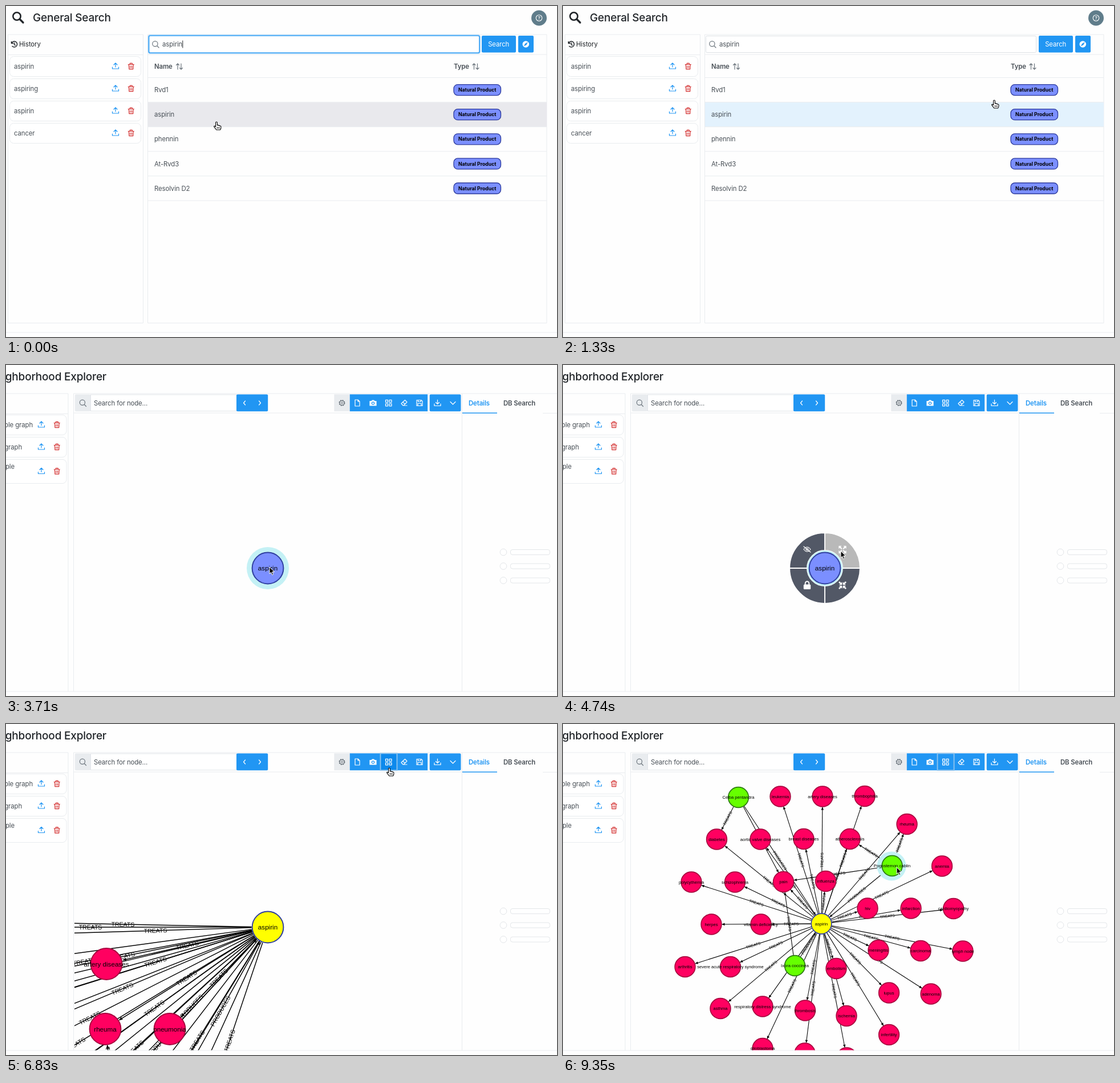
Write an HTML page that moves like this. It is 966 px wide and 580 px high and loops after 9.8 s.

```html
<!DOCTYPE html>
<html lang="en">
<head>
<meta charset="utf-8">
<title>Neighborhood Explorer</title>
<style>
html, body { margin: 0; width: 100%; height: 100%; overflow: hidden; background: #fefefe; }
svg { display: block; width: 966px; height: 580px; }
text { font: 11.4px Inter, Roboto, sans-serif; letter-spacing: -.12px; fill: #495057; }
.title { font-size: 19px; font-weight: 500; letter-spacing: -.2px; fill: #212529; }
.dark { fill: #212529; }
.bold { font-weight: 600; }
.white { fill: #fff; }
.badge { font-size: 8.7px; font-weight: 700; letter-spacing: 0; fill: #000; }
.graph text, .node { font-family: "Liberation Sans", Arial, sans-serif; letter-spacing: 0; fill: #000; text-anchor: middle; }
.end { text-anchor: end; }
.mid { text-anchor: middle; }
.line { stroke: #e9ecef; fill: none; }
.icon { fill: none; stroke-width: 1.2; stroke-linecap: round; stroke-linejoin: round; }
</style>
</head>
<body>
<svg id="stage" viewBox="0 0 966 580"></svg>
<script>
const BLUE = '#2196f3', HOVER = '#0d89ec', RED = '#d32f2f', GREY = '#6c757d';
const LOOP = 9800, STEPS = 66;

const text = (x, y, s, cls = '') => `<text x="${x}" y="${y}" class="${cls}">${s}</text>`;
const rect = (x, y, w, h, fill, more = '') =>
  `<rect x="${x}" y="${y}" width="${w}" height="${h}" fill="${fill}" ${more}/>`;
const line = d => `<path class="line" d="${d}"/>`;
const icon = (x, y, d, color, more = '') =>
  `<path class="icon" transform="translate(${x} ${y})" d="${d}" stroke="${color}" ${more}/>`;
const group = (id, body, more = '') => `<g id="${id}" ${more}>${body}</g>`;
const circle = (x, y, r, fill, more = '') => `<circle cx="${x}" cy="${y}" r="${r}" fill="${fill}" ${more}/>`;
const card = (x, y, w, h) => rect(x, y, w, h, '#fff', 'rx="7" stroke="#e9ecef"');

const ICON = {
  upload: 'M-5.5 1.5V4.5H5.5V1.5M0 1.5V-5.5M-3-2.5L0-5.5L3-2.5',
  download: 'M-5.5 1.5V5H5.5V1.5M0-5.5V2M-3-1L0 2L3-1',
  trash: 'M-5-3H5M-4-3L-3.4 5.2H3.4L4-3M-2-3V-5.2H2V-3M-1.3-.5V2.8M1.3-.5V2.8',
  glass: 'M3 3L6 6M4-.8A4.6 4.6 0 1 1-5.2-.8A4.6 4.6 0 1 1 4-.8',
  sort: 'M-3 5V-5M-5.5-2.5L-3-5L-.5-2.5M3-5V5M.5 2.5L3 5L5.5 2.5',
  file: 'M-4-5.5H1L4-2.5V5.5H-4ZM1-5.5V-2.5H4',
  grid: 'M-5-5H-1V-1H-5ZM1.5-5H5.5V-1H1.5ZM-5 1.5H-1V5.5H-5ZM1.5 1.5H5.5V5.5H1.5Z',
  eraser: 'M-5 1L1.5-5L5-1.5L-1 4.5H-2ZM-2.5-1.5L1.5 2M-1 4.5H5',
  save: 'M-5-5H3L5-3V5H-5ZM-2.5-5V-2H2V-5M-3 5V1H3V5',
  eye: 'M-6 0Q0-8 6 0Q0 8-6 0ZM2 0A2 2 0 1 1-2 0A2 2 0 1 1 2 0M-6-5L6 5'
};

const cardTools = (x, y) =>
  icon(x, y, ICON.upload, BLUE) + icon(x + 27.3, y, ICON.trash, RED);

function homePage() {
  let s = circle(19, 18, 6.7, 'none', 'stroke="#212529" stroke-width="2.6"') +
    icon(0, 0, 'M24.5 23.5L30 29', '#212529', 'style="stroke-width:3.2"') +
    text(47, 27, 'General Search', 'title') +
    circle(934.5, 21, 13.5, '#607d8b') +
    circle(934.5, 21, 5.3, 'none', 'stroke="#fff" stroke-width="1.1"') +
    `<text x="934.5" y="23.8" class="mid white bold" style="font-size:8px">?</text>` +
    line('M3.5 50V555.5H240.5V50ZM3 85.5H241M248.5 50V555.5H948V50ZM248 85H948') +
    icon(14.5, 67, 'M-4.5-2A5 5 0 1 1-3.5 3.5M-5-4.5V-1.5H-2M0-2.5V.5L2 1.8', '#212529', 'style="stroke-width:1.5"') +
    text(23, 71, 'History', 'dark');
  ['aspirin', 'aspiring', 'aspirin', 'cancer'].forEach((name, i) => {
    const y = 88.5 + i * 39;
    s += card(6.5, y, 230, 35) + text(14, y + 21.5, name) + cardTools(192, y + 17);
  });
  s += rect(250.5, 52.5, 579, 29, '#fff', 'rx="2" stroke="#dde1e5"') +
    group('focus', rect(250, 51.5, 580.5, 31, 'none', 'rx="3" stroke="#a6d5fa" stroke-width="3"') +
      rect(250.5, 52, 579.5, 30, 'none', 'rx="2" stroke="#2196f3" stroke-width="1.2"')) +
    icon(262, 67, ICON.glass, GREY) + text(274, 71, 'aspirin') +
    rect(309.3, 60.5, 1, 13, '#212529', 'id="caret"') +
    rect(834, 52, 60, 29.5, BLUE, 'rx="2"') + text(863.7, 71, 'Search', 'mid white') +
    rect(898, 52, 27, 29.5, BLUE, 'rx="2" id="compass"') +
    circle(911.3, 67, 5.8, '#fff') + icon(911.3, 67, 'M3-3L1 1L-3 3L-1-1Z', BLUE, 'style="fill:#2196f3;stroke-width:.5"') +
    text(260, 109.5, 'Name', 'bold') + icon(304, 106, ICON.sort, GREY) +
    text(785, 109.5, 'Type', 'bold') + icon(823.5, 106, ICON.sort, GREY) + line('M249 125.5H948');
  ['Rvd1', 'aspirin', 'phennin', 'At-Rvd3', 'Resolvin D2'].forEach((name, i) => {
    const y = 126 + i * 43.1;
    s += rect(249, y, 699, 42.8, 'none', `id="row${i}"`) + line(`M249 ${y + 42.6}H948`) +
      text(260, y + 25.2, name) +
      rect(785, y + 11.6, 82.5, 19, '#7b8fff', 'rx="7" stroke="#2c3a9c" stroke-width="1.3"') +
      text(826.2, y + 24.2, 'Natural Product', 'badge mid');
  });
  return s;
}

function explorerPage() {
  const button = (x, w, fill, more = '') => rect(x, 51.4, w, 29.8, fill, more);
  let s = text(176, 27, 'Neighborhood Explorer', 'title end') +
    line('M0 50H109V572M0 85.5H109M118.5 572V50H966M799.5 50V572M119 84H799M941 84.5H966');
  [[87.5, 35, 'Example graph', 47], [126.5, 35, 'Small graph', 28], [165.5, 42, 'Example', 15]].forEach(([y, h, name, x], i) => {
    s += card(-98, y, 204, h) + text(x, y + (i == 2 ? 16.5 : 21.5), name, 'end') + cardTools(62, y + h / 2 - .5);
  });
  s += button(120.8, 27.5, '#e9ecef', 'rx="2"') + icon(134.5, 66.5, ICON.glass, GREY) +
    rect(148.5, 52, 256, 28.7, '#fff', 'stroke="#e1e5e9"') + text(154, 70.5, 'Search for node...') +
    button(404, 55.2, BLUE, 'rx="2"') +
    icon(418, 66.5, 'M1.5-3.5L-1.5 0L1.5 3.5', '#fff') + icon(445, 66.5, 'M-1.5-3.5L1.5 0L-1.5 3.5', '#fff') +
    button(575.3, 28, '#e9ecef') +
    circle(589, 66.5, 4.6, 'none', `stroke="${GREY}" stroke-width="1.8" stroke-dasharray="2.2 1.4"`) +
    circle(589, 66.5, 4, 'none', `stroke="${GREY}"`) + circle(589, 66.5, 1.5, 'none', `stroke="${GREY}"`) +
    button(602.8, 136.4, BLUE) + button(742.7, 54.8, BLUE, 'rx="2"') +
    button(657, 28, HOVER, 'id="gridHover"') +
    rect(656.5, 51.5, 29, 29.6, 'none', 'id="gridFocus" stroke="#8fc4ee" stroke-width="1.8"') +
    icon(616, 66.5, ICON.file, '#fff') +
    icon(643.5, 66.5, 'M-5.5-3H-2.5L-1.5-4.5H1.5L2.5-3H5.5V4.5H-5.5Z', '#fff', 'style="fill:#fff"') +
    circle(643.5, 67, 2.2, 'none', `stroke="${BLUE}" stroke-width="1.2"`) +
    icon(670.5, 66.3, ICON.grid, '#fff') + icon(698, 66.5, ICON.eraser, '#fff') +
    icon(725, 66.5, ICON.save, '#fff') + icon(756.5, 66.5, ICON.download, '#fff') +
    icon(783.5, 66.5, 'M-4.5-2L0 2.5L4.5-2', '#fff') +
    `<text x="811" y="71" class="bold" style="fill:${BLUE}">Details</text>` + text(872, 71, 'DB Search', 'bold') +
    rect(800, 83.4, 61, 1.5, BLUE) + rect(863, 83.4, 78, 1.5, '#a5abb1', 'id="tabHover"');
  for (const y of [328, 352.5, 377.5])
    s += circle(872, y, 5.8, '#fff', 'stroke="#e3e6e9"') + rect(884.5, y - 4.5, 69, 9, '#fff', 'rx="3.5" stroke="#e3e6e9"');
  return s;
}

const PAINT = {
  red: ['#ff0060', '#a8063f'], green: ['#66ff00', '#2c7a10'],
  yellow: ['#ffff00', '#303f9f'], blue: ['#7b8fff', '#303f9f']
};

function node(x, y, name, kind, z) {
  const [fill, edge] = PAINT[kind];
  return circle(x, y, 27.4 * z, fill, `stroke="${edge}" stroke-width="${1.1 + .9 * z}"`) +
    `<text class="node" x="${x}" y="${y + 4 * z}" style="font-size:${11.65 * z}px">${name}</text>`;
}

function edge([x1, y1], [x2, y2], label, z) {
  const dx = x2 - x1, dy = y2 - y1, len = Math.hypot(dx, dy), ux = dx / len, uy = dy / len;
  const r = 28.5 * z, ex = x2 - ux * r, ey = y2 - uy * r, deg = Math.atan2(dy, dx) * 180 / Math.PI;
  const turn = deg > 90 ? deg - 180 : deg < -90 ? deg + 180 : deg;
  return `<path d="M${x1 + ux * r} ${y1 + uy * r}L${ex} ${ey}" stroke="#000" stroke-width="${.3 + 1.15 * z}"/>` +
    `<path d="M0 0L-6-2.8V2.8Z" transform="translate(${ex} ${ey}) rotate(${deg}) scale(${.45 + .55 * z})"/>` +
    `<text transform="translate(${(x1 + x2) / 2} ${(y1 + y2) / 2}) rotate(${turn})" y="${3.7 * z}" style="font-size:${10.5 * z}px">${label}</text>`;
}

function wideGraph() {
  const hub = [459, 356], plants = [[187, 638], [293, 650], [71, 774]];
  const ends = [[-163, 356], [-49, 346], [65, 368], [177, 420], [65, 478], [-47, 458], [-185, 476],
    [174, 534], [-51, 572], [-165, 674], [61, 640], [287, 534], [211, 754], [325, 754], [-9, 784], [-217, 768]];
  // nodes whose labels lie outside the view
  for (const y of [456, 530, 560, 585, 645]) ends.push([-275, y]);
  for (let x = -300; x < 250; x += 85) ends.push([x, 900]);
  return ends.map(p => edge(hub, p, 'TREATS', 1)).join('') +
    plants.map(p => edge(p, hub, 'PRODUCES', 1)).join('') +
    edge(plants[0], [174, 534], 'TREATS', 1) +
    node(176, 420.5, 'artery diseases', 'red', 1) + node(174, 534.5, 'rheuma', 'red', 1) +
    node(287, 534.5, 'pneumonia', 'red', 1) + node(...hub, 'aspirin', 'yellow', 1);
}

const DISEASES = `leukemia 381 127,artery diseases 455 127,thrombophilia 529 126.5,diabetes 269.5 202,
aortic valve diseases 346 202,breast diseases 422 201.5,atherosclerosis 503 201.5,rheuma 603 175.5,anemia 664.5 249,
polycythemia 225 277,schizophrenia 301.5 277,pain 386.5 276.5,influenza 460.5 275.5,hiv 534 323,infarction 610 323,
cardiomyopathy 684.5 323.5,herpes 260 351,vitamin deficiency 347 351,meningitis 553 396.5,carcinoma 627 397.5,
lymph node 701 398,arthritis 214 425.5,severe acute respiratory syndrome 293.5 425.5,embolism 479 428.5,
lupus 571.5 471,adenoma 645 473,asthma 276 498.5,respiratory distress syndrome 350 495,thrombosis 424.5 502,
ischemia 497 511.5,infertility 571.5 544.5,glioblastoma 350 568.5,pneumonia 424 577,stroke 497.5 585`;

function fullGraph() {
  const z = .652, hub = [453, 350], at = {};
  const plants = { 'Ceiba pentandra': [307.5, 128.5], 'Pogostemon cablin': [577, 248.5], 'Ixora coccinea': [406.5, 423.5] };
  const treats = {
    'Ceiba pentandra': ['diabetes', 'pain'],
    'Pogostemon cablin': ['atherosclerosis', 'rheuma', 'pain'],
    'Ixora coccinea': ['pain']
  };
  let edges = '', nodes = '';
  for (const item of DISEASES.split(',')) {
    const [, name, x, y] = item.trim().match(/^(.+) (\S+) (\S+)$/);
    at[name] = [+x, +y];
    edges += edge(hub, at[name], 'TREATS', z);
    nodes += node(+x, +y, name, 'red', z);
  }
  for (const name in plants) {
    edges += edge(plants[name], hub, 'PRODUCES', z);
    for (const to of treats[name]) edges += edge(plants[name], at[to], 'TREATS', z);
    nodes += node(...plants[name], name, 'green', z);
  }
  return edges + halo('hubHalo', 453, 350, 25.5) + halo('plantHalo', 576, 249, 25.5) +
    nodes + node(...hub, 'aspirin', 'yellow', z);
}

const halo = (id, x, y, r) => circle(x, y, r, '#c4f1f5', `id="${id}"`);

function menu() {
  const turns = [0, 90, 180, 270];
  const wedge = a => `<path ${a ? '' : 'id="wedge"'} d="M0-61.8A61.8 61.8 0 0 1 61.8 0H31A31 31 0 0 0 0-31Z" fill="#525866" stroke="#fff" stroke-width="1.8" transform="rotate(${a})"/>`;
  const arrows = (y, d) => turns.map(a =>
    `<path d="${d}" fill="#fff" stroke="#fff" stroke-width=".6" transform="translate(31 ${y}) rotate(${a})"/>`).join('');
  const thick = 'L.8 1.6L1.6.8';
  return `<g transform="translate(459 356)">${turns.map(wedge).join('')}` +
    icon(-31, -33, ICON.eye, '#fff') +
    arrows(-32.5, `M6.3 6.3H2L3.4 4.9${thick}L4.9 3.4L6.3 2Z`) +
    arrows(30, 'M1 1H5.3L4 2.4L6.6 5.2L5.2 6.6L2.4 4L1 5.3Z') +
    rect(-37.2, 28.5, 12.4, 8.5, '#fff', 'rx="1.5"') +
    icon(-31, 28, 'M-3.3 1V-1.5A3.3 3.3 0 0 1 3.3-1.5V1', '#fff', 'style="stroke-width:1.9"') + '</g>';
}

const pointer =
  group('hand', '<path d="M-1.4 1.4a1.4 1.4 0 0 1 2.8 0V6q1.6-1 2.4.6q1.5-.7 2.2.6q1.8-.4 2 1.4q.2 3-1.4 5.4H-.2Q-2.4 11-4.2 8.6q-.6-1.6 1-1.4l1.8 1.4z" fill="#fff" stroke="#000" stroke-width="1.1" stroke-linejoin="round"/><path d="M1.2 9v3M3.2 9v3M5.2 9v3" stroke="#000" stroke-width=".8"/>') +
  group('arrow', '<path d="M0 0V11.8L2.7 9.3L4.6 13.8L6.6 12.9L4.7 8.6H8.4Z" stroke="#fff" stroke-width="1"/>');

document.getElementById('stage').innerHTML =
  '<clipPath id="area"><rect x="120" y="85" width="679" height="486.5"/></clipPath>' +
  line('M0 572H966') + group('home', homePage()) +
  group('explorer', explorerPage() + group('single', halo('bigHalo', 459, 356, 37) +
      group('menu', menu()) + circle(459, 356, 31, '#c4f1f5', 'id="ring"') + node(459, 356, 'aspirin', 'blue', 1)) +
    `<g class="graph" clip-path="url(#area)">${group('wide', wideGraph())}${group('full', fullGraph())}</g>`) +
  group('cursor', pointer);

// step, x, y of the pointer tip
const PATH = [[5, 369, 203], [7, 540, 160], [8, 540, 160], [9, 756, 165], [10, 820, 136], [11, 870, 104],
  [12, 902, 76], [14, 909, 62], [20, 909, 62], [21, 850, 110], [23, 600, 265], [24, 495, 335], [25, 462, 354],
  [29, 462, 354], [32, 487, 326], [33, 489, 324], [34, 510, 300], [35, 510, 300], [38, 495, 322],
  [40, 495, 322], [42, 560, 230], [44, 660, 95], [45, 672, 77], [46, 672, 77], [47, 640, 120], [48, 560, 232],
  [49, 531, 252], [53, 531, 252], [54, 498, 327], [56, 457, 352], [58, 457, 352], [60, 510, 297], [61, 550, 254],
  [62, 573, 252], [63, 585, 251]];

function tip(k) {
  const i = PATH.findIndex(p => p[0] >= k);
  if (i < 0) return PATH[PATH.length - 1].slice(1);
  const b = PATH[i], a = PATH[i - 1] || b, f = b === a ? 0 : (k - a[0]) / (b[0] - a[0]);
  return [a[1] + (b[1] - a[1]) * f, a[2] + (b[2] - a[2]) * f];
}

const el = id => document.getElementById(id);
const show = (id, on) => { el(id).style.display = on ? '' : 'none'; };
const fill = (id, color) => el(id).setAttribute('fill', color);

function render(k) {
  const within = (a, b) => k >= a && k < b;
  show('home', k < 17);
  show('explorer', k >= 17);
  show('caret', k < 3);
  el('focus').style.opacity = k < 3 ? 1 : k < 4 ? .45 : 0;
  fill('row0', within(7, 9) ? '#e9ecef' : 'none');
  fill('row1', k < 3 ? '#e9e9ed' : k < 4 ? '#e5eff7' : '#e3f2fd');
  fill('compass', k >= 12 ? HOVER : BLUE);
  show('tabHover', within(17, 21));
  show('single', within(18, 36));
  show('bigHalo', within(25, 34));
  show('ring', within(29, 34));
  show('menu', within(29, 34));
  fill('wedge', within(31, 34) ? '#b9b9b9' : '#525866');
  show('wide', within(36, 47));
  show('full', k >= 47);
  show('gridHover', within(45, 47));
  show('gridFocus', k >= 46);
  show('hubHalo', within(56, 59));
  show('plantHalo', k >= 63);
  const hand = k < 21 || within(44, 47);
  show('hand', hand);
  show('arrow', !hand);
  el('cursor').setAttribute('transform', `translate(${tip(k)})`);
}

let last = -1;
function tick() {
  const t = performance.now() % LOOP;
  const k = Math.min(STEPS - 1, Math.floor((t + 13) * STEPS / LOOP));
  if (k !== last) render(last = k);
  requestAnimationFrame(tick);
}
tick();
</script>
</body>
</html>
```
